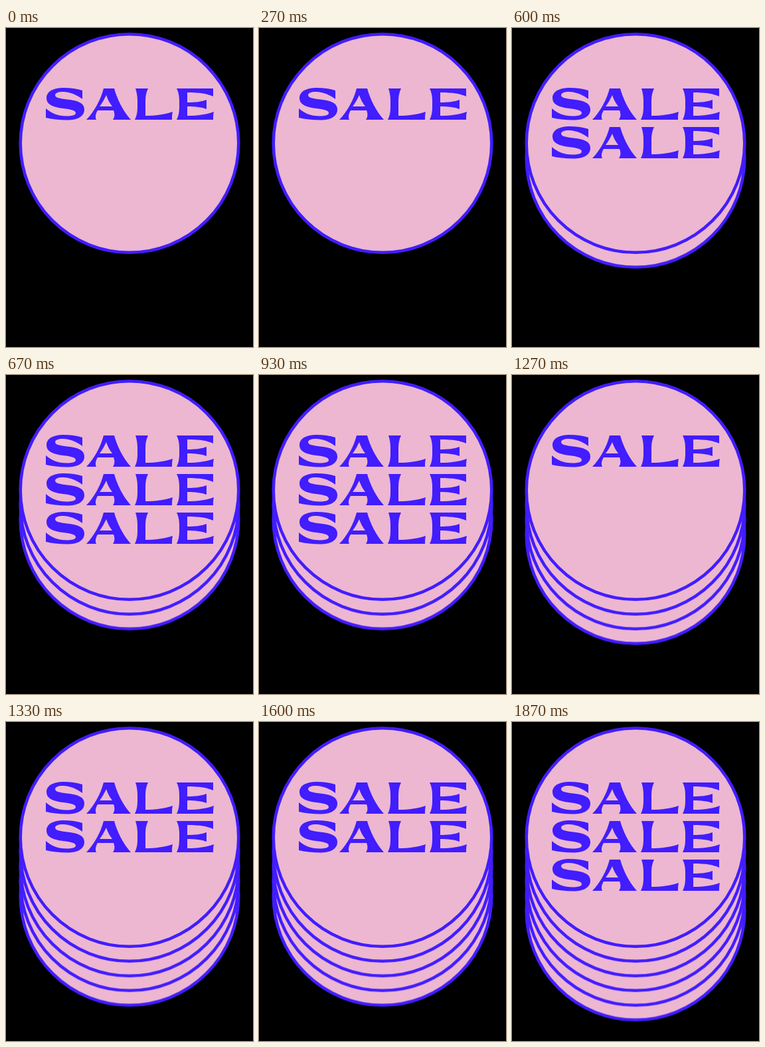
An HTML page for the animation above (1.99 s loop, 372 px wide and 480 px high).

```html
<!DOCTYPE html>
<html lang="en">
<head>
<meta charset="utf-8">
<title>Sale</title>
<style>
  html, body { margin: 0; width: 100%; height: 100%; overflow: hidden; background: #000; }
  svg { display: block; width: 372px; height: 480px; }
  .disc { fill: #edb7d1; stroke: #411dff; stroke-width: 4.6; }
  .word { fill: #411dff; }
  .d1, .d2, .d3, .d4, .d5, .w2, .w3 { opacity: 0; animation: 1990ms step-end infinite; }
  .d1 { animation-name: d1; }
  .d2 { animation-name: d2; }
  .d3 { animation-name: d3; }
  .d4 { animation-name: d4; }
  .d5 { animation-name: d5; }
  .w2 { animation-name: w2; }
  .w3 { animation-name: w3; }
  /* six beats: 0, 330, 670, 1000, 1330, 1670 ms */
  @keyframes d1 { 0% { opacity: 0 } 16.58%, 100% { opacity: 1 } }
  @keyframes d2 { 0% { opacity: 0 } 33.66%, 100% { opacity: 1 } }
  @keyframes d3 { 0% { opacity: 0 } 50.25%, 100% { opacity: 1 } }
  @keyframes d4 { 0% { opacity: 0 } 66.83%, 100% { opacity: 1 } }
  @keyframes d5 { 0% { opacity: 0 } 83.91%, 100% { opacity: 1 } }
  @keyframes w2 {
    0%, 50.25% { opacity: 0 }
    16.58%, 66.83%, 100% { opacity: 1 }
  }
  @keyframes w3 {
    0%, 50.25% { opacity: 0 }
    33.66%, 83.91%, 100% { opacity: 1 }
  }
</style>
</head>
<body>
<svg viewBox="0 0 372 480" role="img" aria-label="SALE SALE SALE">
  <defs>
    <circle id="disc" cx="186" cy="173.5" r="164.3"/>
    <g id="word" fill-rule="evenodd">
      <path d="M115 94V107C107 101 97 96 86 96C78 96 74 98 74 101C74 105 81 106 92 107.500C109 109.500 118 113 118 122.500C118 133 108 138.500 92 138.500C80 138.500 69 137 60 135V121C68 128 78 132.500 91 132.500C100 132.500 105 131 105 128C105 123.500 97 122.500 86 121C70 119 61 115 61 105.500C61 95 72 90 87 90C97 90 107 91.500 115 94Z"/>
      <path d="M147 91H163C167 106 176 125 188 138H161C164 134 164 129 162 124H138C135 129 134 134 136 138H121C133 126 143 107 147 91ZM151 101C148 107 145 113 141 118H160C156 113 153 107 151 101Z"/>
      <path d="M195 91H214C211 97 210 103 210 110V132C225 132 239 130 251 126C250 130 250 134 250 138H194C197 132 198 126 198 119V110C198 103 197 97 195 91Z"/>
      <path d="M257 91H312V103C303 99 293 97 273 97V112C285 112 294 111 302 108V122C294 119 285 118 273 118V132C289 132 302 130 313 126C312 130 312 134 312 138H257C260 132 261 126 261 119V110C261 103 260 97 257 91Z"/>
    </g>
  </defs>
  <g class="disc">
    <use href="#disc" class="d5" y="110.500"/>
    <use href="#disc" class="d4" y="88.400"/>
    <use href="#disc" class="d3" y="66.300"/>
    <use href="#disc" class="d2" y="44.200"/>
    <use href="#disc" class="d1" y="22.100"/>
    <use href="#disc"/>
  </g>
  <g class="word">
    <use href="#word"/>
    <use href="#word" class="w2" y="58"/>
    <use href="#word" class="w3" y="116"/>
  </g>
</svg>
</body>
</html>
```
